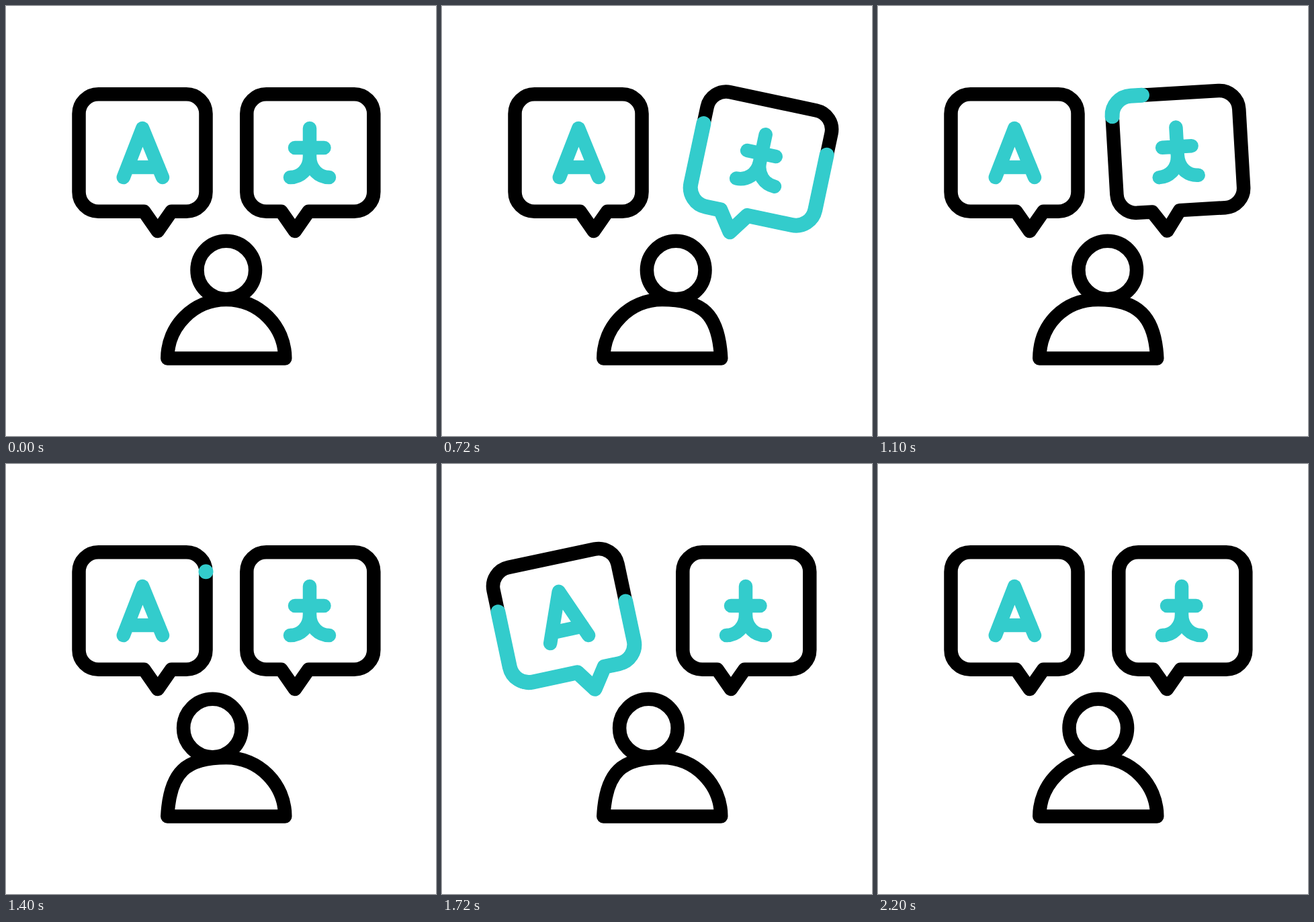
These frames come from a looping animation (640 by 640 pixels, 2400 ms). An HTML page:

```html
<!DOCTYPE html>
<html lang="en">
<head>
<meta charset="utf-8">
<title>Translation</title>
<style>
  html, body { margin: 0; width: 100%; height: 100%; overflow: hidden; background: #fff; }
  svg { display: block; width: 100%; height: 100%; }
  path, circle { fill: none; stroke: #000; stroke-width: 20.5; stroke-linecap: round; stroke-linejoin: round; }
  .glyph { stroke: #33cccc; }
  .trace { stroke: #33cccc; stroke-width: 22; }
</style>
</head>
<body>
<svg viewBox="0 0 640 640">
  <defs>
    <path id="bubble" pathLength="1" d="M358.3 160.3V276.7A29 29 0 0 0 387.3 305.7H409.5L430 335L450.5 305.7H518.3A29 29 0 0 0 547.3 276.7V160.3A29 29 0 0 0 518.3 131.3H387.3A29 29 0 0 0 358.3 160.3Z"/>
  </defs>
  <g id="left">
    <g transform="matrix(-1 0 0 1 655.8 0)"><use href="#bubble"/><path class="trace"/></g>
    <path class="glyph" d="M174.8 255L203.2 182L233 255M181 240H227"/>
  </g>
  <g id="right">
    <use href="#bubble"/><path class="trace"/>
    <path class="glyph" d="M452 182V224C452 243 438 255 423 255M452 224C452 243 466 255 481 255M430 211H473.5"/>
  </g>
  <circle id="head" cy="393" r="43.3"/>
  <path id="body"/>
</svg>
<script>
const LOOP = 2400, CX = 327.8;
const $ = id => document.getElementById(id);
const outline = $('bubble').getAttribute('d');
const mix = (a, b, k) => a + (b - a) * k;

// Smooth 0 to 1 between two times
function ease(t, from, to) {
  const u = Math.min(1, Math.max(0, (t - from) / (to - from)));
  return u * u * (3 - 2 * u);
}

function makeBubble(id, sign, px, py, begin, tailStart, tailEnd) {
  const group = $(id), trace = group.querySelector('.trace');
  trace.setAttribute('d', outline);
  trace.setAttribute('pathLength', 1);
  return time => {
    const t = time - begin;
    const angle = 12 * ease(t, 0, 320) - 18.8 * ease(t, 320, 600) + 6.8 * ease(t, 600, 800);
    group.setAttribute('transform', `rotate(${sign * angle} ${px} ${py})`);
    const start = ease(t, tailStart, tailEnd), end = ease(t, 0, 540);
    trace.style.display = end - start > 1e-5 ? '' : 'none';
    trace.setAttribute('stroke-dasharray', `${end - start} 2`);
    trace.setAttribute('stroke-dashoffset', -start);
  };
}

const bubbles = [
  makeBubble('right', 1, 423, 328, 400, 260, 800),
  makeBubble('left', -1, 225.5, 326, 1400, 220, 800)
];

// Control points of one shoulder: k = 0 round, k = 1 leaning
function shoulder(side, k) {
  return {
    top: `${CX + side * mix(48.3, 60.2, k)} 437`,
    low: `${CX + side * mix(87.5, 84.2, k)} ${mix(476.2, 458.5, k)}`
  };
}

function person(t) {
  const swap = ease(t, 1000, 1400);
  const r = ease(t, 200, 400) - swap, l = swap - ease(t, 2000, 2200);
  const a = shoulder(-1, l), b = shoulder(1, r);
  $('head').setAttribute('cx', CX + 20.4 * (r - l));
  $('body').setAttribute('d',
    `M240.3 524.5C${a.low} ${a.top} ${CX} 437C${b.top} ${b.low} 415.3 524.5Z`);
}

function draw(now) {
  const t = now % LOOP;
  bubbles.forEach(update => update(t));
  person(t);
}

const origin = performance.now();
function tick() {
  draw(performance.now() - origin);
  requestAnimationFrame(tick);
}
tick();
</script>
</body>
</html>
```
